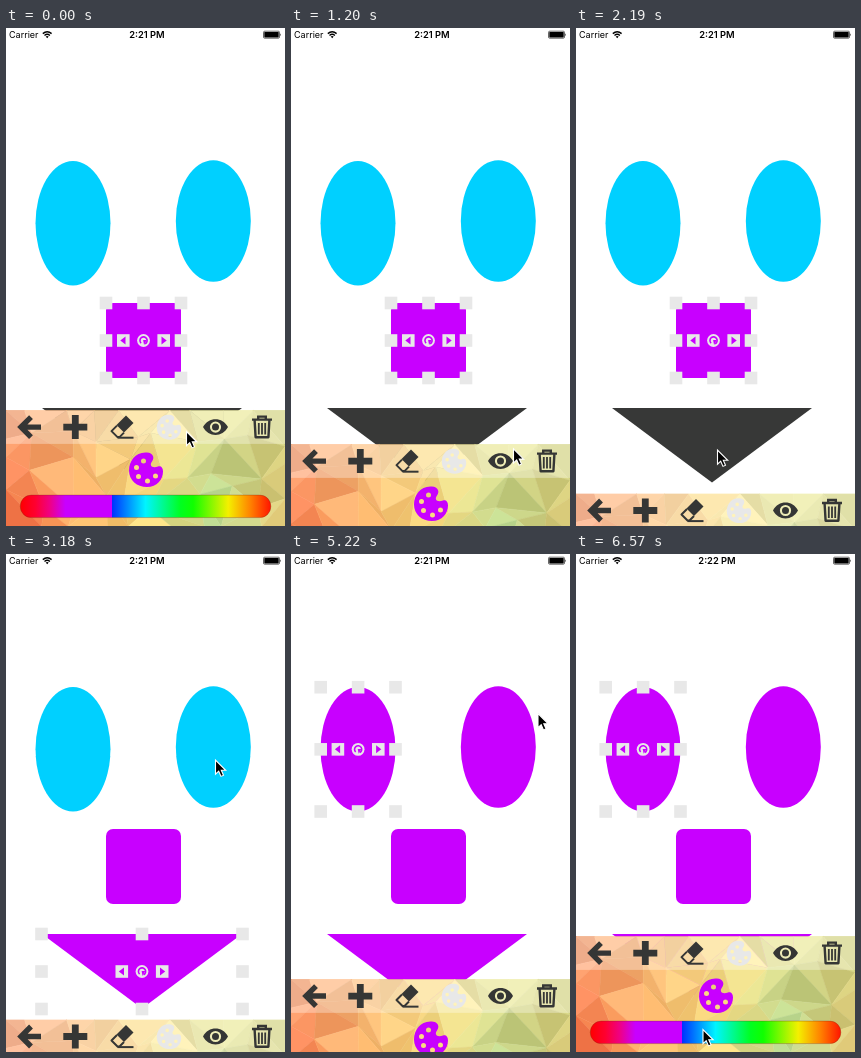
An HTML page for the animation above (7.08 s loop, 279 by 498 pixels).

```html
<!DOCTYPE html>
<html lang="en">
<head>
<meta charset="utf-8">
<title>Face editor</title>
<style>
  html, body { margin: 0; width: 100%; height: 100%; overflow: hidden; background: #fff; }
  svg { display: block; width: 100%; height: 100%; }
  text { font-family: Inter, Roboto, sans-serif; fill: #000; }
  .icon { fill: #353635; stroke: none; }
  .line { fill: none; stroke: #353635; }
  .grip { fill: #e8e8e8; }
  .mark { fill: #c800ff; }
</style>
</head>
<body>
<svg viewBox="0 0 279 498">
  <defs>
    <linearGradient id="hues">
      <stop offset="0" stop-color="#ff0000"/>
      <stop offset=".06" stop-color="#ff0030"/>
      <stop offset=".12" stop-color="#ee0088"/>
      <stop offset=".18" stop-color="#c800ff"/>
      <stop offset=".365" stop-color="#c800ff"/>
      <stop offset=".365" stop-color="#0030ff"/>
      <stop offset=".5" stop-color="#00f4ff"/>
      <stop offset=".64" stop-color="#00ff20"/>
      <stop offset=".69" stop-color="#10ff00"/>
      <stop offset=".83" stop-color="#f4f000"/>
      <stop offset=".92" stop-color="#ff8000"/>
      <stop offset="1" stop-color="#ff1400"/>
    </linearGradient>
    <path id="palette" fill-rule="evenodd" d="M1-17C-10-18-17-9-17 1C-17 11-9 17.5 1 17.5C11 17.5 17 10 17 2C17-2 15-4 12-3C6-1 3-4 6-8C9-12 7-16.5 1-17Z
      M-12-2a2.5 2.5 0 1 0 5 0a2.5 2.5 0 1 0-5 0Z
      M-5-8.5a2.5 2.5 0 1 0 5 0a2.5 2.5 0 1 0-5 0Z
      M-10 7a2.5 2.5 0 1 0 5 0a2.5 2.5 0 1 0-5 0Z
      M-1 11.5a2.5 2.5 0 1 0 5 0a2.5 2.5 0 1 0-5 0Z
      M7 6.5a2.5 2.5 0 1 0 5 0a2.5 2.5 0 1 0-5 0Z"/>
  </defs>
  <rect width="279" height="498" fill="#fff"/>

  <g id="status">
    <text x="3" y="10" font-size="9">Carrier</text>
    <text id="clock" x="141" y="10" font-size="9.3" font-weight="600" text-anchor="middle">2:21 PM</text>
    <g fill="none" stroke="#000" stroke-width="1.4">
      <path d="M36.8 5.6Q41.2 1.8 45.6 5.6M38.5 7.5Q41.2 5.2 43.9 7.5"/>
    </g>
    <path d="M39.7 8.6Q41.2 7.3 42.7 8.6L41.2 10.2Z"/>
    <rect x="257.5" y="3.2" width="16" height="7" rx="1.2" fill="none" stroke="#000" stroke-width=".6"/>
    <rect x="258.3" y="4" width="14.4" height="5.4" rx=".6"/>
    <path d="M274.2 5.2q1.3 1.5 0 3Z"/>
  </g>

  <ellipse id="left" cx="67" cy="195.3" rx="37.5" ry="62.2"/>
  <ellipse id="right" cx="207.3" cy="193" rx="37.5" ry="60.8"/>
  <rect id="nose" x="100" y="275" width="75" height="75" rx="7"/>
  <path id="mouth" d="M36 380H236L136 454.5Z"/>
  <g id="frame"></g>

  <g id="panel">
    <g id="mesh"></g>
    <rect width="279" height="33.3" fill="#fff" opacity=".32"/>
    <g transform="translate(23 16.5)">
      <path class="line" stroke-width="5.4" d="M-8 0H12M2-10L-8 0L2 10"/>
    </g>
    <path class="icon" transform="translate(69.3 16.5)" d="M-3.4-12H3.4V-3.4H12V3.4H3.4V12H-3.4V3.4H-12V-3.4H-3.4Z"/>
    <g transform="translate(116 16.5)">
      <path class="icon" d="M4-11.5L11.5-4L2 5.5L-5.5-2Z"/>
      <path class="line" stroke-width="2" stroke-linejoin="round" d="M-5-1.5L-10.5 4L-4.5 10H-2.5L2 5.5"/>
      <path class="line" stroke-width="2" d="M-4.5 10.6H11.5"/>
    </g>
    <use href="#palette" fill="#e8e8e8" transform="translate(163 16.5) scale(.72)"/>
    <g class="icon" transform="translate(209.5 16.5)">
      <path fill-rule="evenodd" d="M-12.5 0C-7-10.6 7-10.6 12.5 0C7 10.6-7 10.6-12.5 0ZM-5.6 0a5.6 5.6 0 1 0 11.2 0a5.6 5.6 0 1 0-11.2 0Z"/>
      <circle r="3.5"/>
    </g>
    <g class="line" transform="translate(256 16.5)">
      <path stroke-width="2.4" d="M-10-7.5H10M-3.8-7.5V-10.5H3.8V-7.5"/>
      <path stroke-width="2.4" stroke-linejoin="round" d="M-7.4-7L-6.4 10.2H6.4L7.4-7"/>
      <path stroke-width="1.8" d="M-3.2-4V7.5M0-4V7.5M3.2-4V7.5"/>
    </g>
    <use class="mark" href="#palette" transform="translate(140 59)"/>
    <rect x="14.3" y="84.5" width="250.5" height="22.5" rx="11" fill="url(#hues)" stroke="#7a2a10" stroke-opacity=".45" stroke-width=".7"/>
  </g>

  <path id="cursor" d="M0 0V14.2L3.2 11.2L5.5 16.4L8 15.3L5.8 10.3H10.2Z" stroke="#fff" stroke-width="1.1"/>
</svg>
<script>
const $ = id => document.getElementById(id);
const LOOP = 7080, STEP = 30;
const PURPLE = '#c800ff', CYAN = '#00d0ff', DARK = '#373837';
const OPEN = 382.6, SHUT = 466;

// Pointer moves: start, end, x, y
const START = [180.5, 403.5];
const MOVES = [
  [240, 660, 222.5, 322], [870, 1290, 222.5, 434],
  [1290, 1590, 191, 392], [1590, 1770, 178.5, 480],
  [1890, 2190, 141.5, 422], [2640, 2850, 269, 274],
  [2970, 3180, 209.5, 206], [3630, 4050, 81.5, 195],
  [4410, 4590, 224.5, 326.5], [4710, 4920, 238, 440],
  [4950, 5220, 247, 159.5], [5220, 5430, 215, 280],
  [5430, 5970, 126.5, 475], [6120, 6150, 127.5, 476],
  [6210, 6240, 127, 475.5]
];

// Shapes in the order they are tapped: id, tap time, first fill, box
const SHAPES = [
  ['nose', 0, PURPLE, [100, 275, 175, 350]],
  ['mouth', 2310, DARK, [35.5, 380, 236.5, 455]],
  ['right', 3450, CYAN, [170, 132, 244.8, 254]],
  ['left', 4170, CYAN, [29.7, 133.2, 104.5, 257.5]]
];

const clamp = u => Math.min(1, Math.max(0, u));
const ease = u => u * u * (3 - 2 * u);
const span = (t, a, b) => ease(clamp((t - a) / (b - a)));
const mix = (a, b, u) => a + (b - a) * u;

function grip(x, y) {
  return `<rect class="grip" x="${x - 6.3}" y="${y - 6.3}" width="12.6" height="12.6"/>`;
}

function frameMarkup([x0, y0, x1, y1]) {
  const cx = (x0 + x1) / 2, cy = (y0 + y1) / 2;
  let out = '';
  for (const y of [y0, cy, y1])
    for (const x of [x0, cx, x1])
      if (x !== cx || y !== cy) out += grip(x, y);
  for (const side of [-1, 1]) {
    const x = cx + side * 20.2;
    out += grip(x, cy) +
      `<path class="mark" d="M${x + side * 3} ${cy}l${-side * 5.2} -4v8Z"/>`;
  }
  return out + `<g transform="translate(${cx} ${cy})">
    <circle class="grip" r="6.4"/>
    <path d="M-2.4 2.6A3.6 3.6 0 1 1 1.6 3.2" fill="none" stroke="${PURPLE}" stroke-width="1.6"/>
    <path class="mark" d="M-.4 -.4H3.2L.6 4.4Z"/></g>`;
}

// Low-poly backdrop: jittered grid, coloured by position
function meshMarkup() {
  const top = [[246, 150, 100], [251, 190, 128], [248, 220, 138], [226, 220, 138], [214, 218, 136]];
  const low = [[250, 112, 74], [252, 172, 94], [245, 214, 120], [172, 212, 142], [232, 200, 118]];
  const COLS = 9, ROWS = 4, W = 279 / COLS, H = 116 / ROWS;
  let seed = 11;
  const rand = () => (seed = seed * 16807 % 2147483647) / 2147483647;
  const pts = [];
  for (let r = 0; r <= ROWS; r++)
    for (let c = 0; c <= COLS; c++) {
      const edgeX = c % COLS === 0, edgeY = r % ROWS === 0;
      pts.push([c * W + (edgeX ? 0 : (rand() - .5) * W * .8),
                r * H + (edgeY ? 0 : (rand() - .5) * H * .8)]);
    }
  const tint = (x, y) => {
    const p = clamp(x / 279) * 3.999, i = Math.floor(p), light = (rand() - .5) * 38;
    return [0, 1, 2].map(k => Math.round(light + mix(
      mix(top[i][k], top[i + 1][k], p - i),
      mix(low[i][k], low[i + 1][k], p - i), y / 116)));
  };
  const tri = (...ids) => {
    const [a, b, c] = ids.map(i => pts[i]);
    const fill = `rgb(${tint((a[0] + b[0] + c[0]) / 3, (a[1] + b[1] + c[1]) / 3)})`;
    return `<path d="M${a}L${b}L${c}Z" fill="${fill}" stroke="${fill}" stroke-width=".5"/>`;
  };
  let out = '';
  for (let r = 0; r < ROWS; r++)
    for (let c = 0; c < COLS; c++) {
      const a = r * (COLS + 1) + c, b = a + 1, d = a + COLS + 1, e = d + 1;
      out += rand() < .5 ? tri(a, b, d) + tri(b, e, d) : tri(a, b, e) + tri(a, e, d);
    }
  return out;
}

function pointer(t) {
  let [x, y] = START;
  for (const [a, b, tx, ty] of MOVES) {
    if (t <= a) break;
    const u = span(t, a, b);
    x = mix(x, tx, u);
    y = mix(y, ty, u);
  }
  return [x, y];
}

let selected = '';
function draw(t) {
  let active;
  for (const shape of SHAPES) {
    const [id, tap, first] = shape;
    const done = t >= tap;
    $(id).setAttribute('fill', done ? PURPLE : first);
    if (done) active = shape;
  }
  if (active[0] !== selected) {
    selected = active[0];
    $('frame').innerHTML = frameMarkup(active[3]);
  }
  const shut = span(t, 981, 1481) - span(t, 4975, 5475);
  $('panel').setAttribute('transform', `translate(0 ${mix(OPEN, SHUT, shut)})`);
  $('cursor').setAttribute('transform', `translate(${pointer(t)})`);
  $('clock').textContent = t >= 6570 ? '2:22 PM' : '2:21 PM';
}

$('mesh').innerHTML = meshMarkup();
const begin = performance.now();
function tick() {
  const t = (performance.now() - begin) % LOOP;
  draw(Math.floor(t / STEP) * STEP);
  requestAnimationFrame(tick);
}
tick();
</script>
</body>
</html>
```
